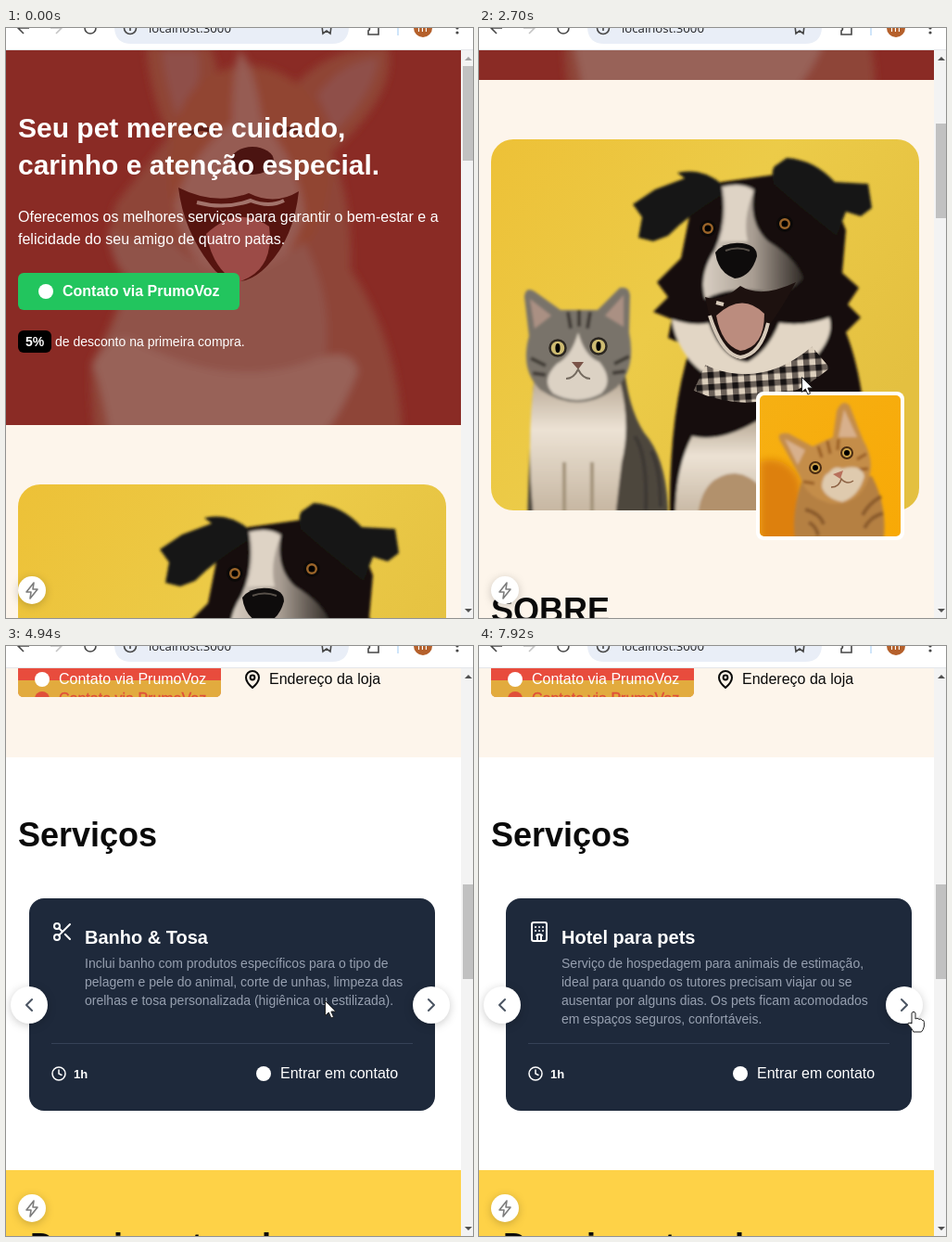
Animation, 504 px wide and 636 px high, one loop 7990 ms. Source, as an HTML page:

```html
<!DOCTYPE html>
<html lang="pt-BR">
<head>
<meta charset="utf-8">
<title>Pet shop</title>
<style>
html, body { margin: 0; width: 100%; height: 100%; overflow: hidden; background: #fff; }
svg { display: block; }
text { font: 16px "Liberation Sans", Arial, sans-serif; fill: #0a0a0a; white-space: pre; }
.w { fill: #fff; }
.b { font-weight: 700; }
.h1 { font-size: 30px; font-weight: 700; }
.h2 { font-size: 36px; font-weight: 700; }
.sm { font-size: 14px; }
.title { font-size: 20px; font-weight: 700; }
.desc { font-size: 14px; fill: #97a0b0; }
.dur { font-size: 13px; font-weight: 700; }
.red { fill: #e0503a; }
.url { font: 13.2px "Open Sans", "Noto Sans", sans-serif; fill: #202124; }
.line { fill: none; stroke-width: 2; stroke-linecap: round; stroke-linejoin: round; }
.ui { fill: none; stroke: #474747; stroke-width: 1.6; }
.soft { filter: drop-shadow(0 2px 5px #0003); }
</style>
</head>
<body>
<svg width="504" height="636" viewBox="0 0 504 636">
  <defs>
    <linearGradient id="sun" x2="1" y2=".6">
      <stop offset="0" stop-color="#edc137"/><stop offset=".5" stop-color="#eccb48"/><stop offset="1" stop-color="#e4c040"/>
    </linearGradient>
    <linearGradient id="amber" x2="1" y2="1">
      <stop offset="0" stop-color="#f6b013"/><stop offset="1" stop-color="#f8a906"/>
    </linearGradient>
    <linearGradient id="muzzle">
      <stop offset="0" stop-color="#d8cec2"/><stop offset=".5" stop-color="#a89d92"/><stop offset="1" stop-color="#2f2925"/>
    </linearGradient>
    <linearGradient id="chest" x2="0" y2="1">
      <stop offset="0" stop-color="#b5a591"/><stop offset=".35" stop-color="#ece2d4"/><stop offset="1" stop-color="#bfae98"/>
    </linearGradient>
    <pattern id="check" width="13" height="13" patternUnits="userSpaceOnUse" patternTransform="rotate(-4)">
      <path fill="#dccfbd" d="M0 0h13v13H0z"/><path fill="#6a6058" d="M0 0h13v6.5H6.5V13H0z"/><path fill="#171313" d="M0 0h6.5v6.5H0z"/>
    </pattern>
    <filter id="blur"><feGaussianBlur stdDeviation="4"/></filter>
    <filter id="fur"><feGaussianBlur stdDeviation="1.5"/></filter>
    <clipPath id="hero"><path d="M0 24h491v404H0z"/></clipPath>
    <clipPath id="photo"><rect x="13" y="292" width="462" height="400" rx="24"/></clipPath>
    <clipPath id="inset"><rect x="303" y="259" width="152" height="152" rx="5"/></clipPath>
    <clipPath id="track"><path d="M13 272h462v229H13z"/></clipPath>
    <clipPath id="band"><path d="M13 639h219v12q0 6-6 6H19q-6 0-6-6z"/></clipPath>
  </defs>

  <g id="page">
    <path fill="#fdf5eb" d="M0 428h491v991H0z"/>
    <path fill="#fff" d="M0 1419h491v445H0z"/>
    <path fill="#fed247" d="M0 1864h491v300H0z"/>

    <!-- hero -->
    <g clip-path="url(#hero)">
      <path fill="#8a2b25" d="M0 24h491v404H0z"/>
      <g filter="url(#blur)">
        <path fill="#8e4537" d="M118 190Q150 150 180 110L345 120Q375 180 372 260Q425 340 428 440H96Q90 390 92 360Q120 310 128 270Q104 240 118 190z"/>
        <path fill="#8f4535" d="M151 20H220Q236 50 218 84L178 122Q156 76 151 20zM306 68Q345 20 412 20Q424 70 352 134z"/>
        <path fill="#8f5049" d="M168 24H206Q214 50 200 76L184 94Q172 60 168 24zM336 72Q362 36 402 32Q396 74 354 112z"/>
        <path fill="#914431" d="M182 110Q196 44 262 40Q330 46 350 120Q356 200 320 240L190 230Q166 170 182 110z"/>
        <path fill="#965c52" d="M252 24Q268 40 276 98Q318 150 322 200Q300 280 240 284Q190 250 182 190Q196 140 244 102Q244 50 252 24z"/>
        <path fill="#90534a" d="M112 215Q140 240 180 230Q240 300 322 230Q352 290 346 350Q300 400 200 390Q110 400 92 366Q120 320 134 270Q108 246 112 215z"/>
        <path fill="#986259" d="M94 362Q120 320 144 340Q240 390 326 360Q372 340 380 370Q360 420 340 440H112Q104 390 94 362z"/>
      </g>
      <path fill="#56140f" d="M186 172Q226 192 262 178Q290 192 316 176Q310 232 276 262Q250 284 226 262Q192 222 186 172z"/>
      <path fill="#9c4b47" d="M216 222Q250 190 284 214Q290 262 250 274Q224 262 216 222z"/>
      <path fill="none" stroke="#a2736b" stroke-width="4" d="M206 188Q236 196 264 186Q284 194 300 186"/>
      <ellipse cx="266" cy="143" rx="23" ry="15" fill="#4b1411"/>
      <path fill="none" stroke="#571c15" stroke-width="5" stroke-linecap="round" d="M199 114q12-10 24-2M296 112q12-8 24 4"/>
    </g>
    <text class="h1 w" x="13" y="118">Seu pet merece cuidado,</text>
    <text class="h1 w" x="13" y="158">carinho e atenção especial.</text>
    <text class="w" x="13" y="209">Oferecemos os melhores serviços para garantir o bem-estar e a</text>
    <text class="w" x="13" y="233">felicidade do seu amigo de quatro patas.</text>
    <rect x="13" y="264" width="239" height="40" rx="6" fill="#22c55e"/>
    <circle class="w" cx="43" cy="284" r="8"/>
    <text class="b w" x="61" y="289">Contato via PrumoVoz</text>
    <rect x="13" y="326" width="36" height="24" rx="6"/>
    <text class="sm b w" x="21" y="343">5%</text>
    <text class="sm w" x="53" y="343">de desconto na primeira compra.</text>

    <!-- dog and cat -->
    <g transform="translate(0 200)" clip-path="url(#photo)">
      <path fill="url(#sun)" d="M13 292h462v400H13z"/>
      <g filter="url(#fur)">
        <path fill="#15110f" d="M232 350L218 420L192 446L204 462L188 478L208 486L204 506L228 516Q204 590 206 710H420Q424 570 396 500L412 484L398 470L410 452L392 436L396 390L380 350L320 330L262 338z"/>
        <path fill="#181412" d="M262 340Q240 322 214 328L222 334L190 346L166 362L176 376L172 398L188 402L204 396Q226 374 262 352zM318 340Q314 322 322 319L332 312Q362 314 384 338L420 340L424 366L412 375L396 370L386 396Q340 360 318 340z"/>
        <path fill="#e2d6c5" d="M208 486Q232 494 248 490Q262 530 290 532Q312 520 324 490Q352 494 378 484Q384 504 362 528Q310 556 240 542Q214 522 208 486z"/>
        <path fill="url(#chest)" d="M230 612Q262 620 306 592V710H212Q210 650 230 612z"/>
        <path fill="#b2916c" d="M236 700Q240 654 276 652Q310 656 316 700z"/>
        <path fill="url(#muzzle)" d="M262 343Q284 338 297 346Q290 382 312 402Q342 420 350 442Q326 466 306 456Q270 450 244 464Q237 438 254 412Q268 382 262 343z"/>
        <path fill="#ded3c5" d="M264 344Q284 338 296 348Q284 380 290 402H260Q270 374 264 344z"/>
      </g>
      <path fill="#1d110f" d="M244 462Q262 468 282 450Q304 464 342 446Q326 476 312 494Q306 528 280 529Q256 522 244 462z"/>
      <path fill="#bb8c7e" d="M256 482Q284 456 308 480Q308 516 282 520Q262 514 256 482z"/>
      <path fill="none" stroke="#d6c9b9" stroke-width="4" d="M249 482Q262 524 282 527Q304 524 312 490M256 468l8 2"/>
      <path fill="#0e0c0c" d="M255 414Q264 402 284 404Q300 406 300 418Q294 440 276 442Q258 436 255 414z"/>
      <path fill="none" stroke="#575049" stroke-width="2" d="M266 412q13-5 26 0"/>
      <g fill="#9a6429" stroke="#0c0908" stroke-width="3"><circle cx="247" cy="388" r="7.5"/><circle cx="330" cy="383" r="7.5"/></g>
      <circle cx="247" cy="388" r="3.5"/><circle cx="330" cy="383" r="3.5"/>
      <path fill="none" stroke="url(#check)" stroke-width="30" d="M238 549Q306 580 369 527"/>

      <g filter="url(#fur)">
        <path fill="#4d463e" d="M60 540L156 530Q160 580 178 608Q206 640 204 710H52Q54 620 60 540z"/>
        <path fill="url(#chest)" d="M60 548Q108 590 152 552Q164 600 154 640Q150 672 146 710H60Q50 620 60 548z"/>
        <path fill="none" stroke="#a39379" stroke-width="4" d="M92 640V700M122 640V700"/>
        <path fill="#79736a" d="M54 504L49 462Q50 450 60 456L88 476H128L152 452Q162 450 163 460L162 500Q170 540 148 560Q108 590 66 562Q44 540 54 504z"/>
        <path fill="#aa9083" d="M55 464L78 482L60 496zM156 460L136 482L156 494z"/>
        <path fill="none" stroke="#3c3833" stroke-width="4" d="M96 478l3 18M108 476v18M120 478l-3 18M56 528l16 8M162 526l-16 8M58 544l14 2M158 542l-14 2M168 612q14 20 12 80M186 628q10 20 10 60"/>
        <path fill="#dcd2c4" d="M107 500Q114 526 130 532Q146 552 132 566Q106 580 80 566Q66 552 84 534Q100 526 107 500z"/>
      </g>
      <g fill="#cdbb72" stroke="#2c2721" stroke-width="2.5"><circle cx="85" cy="517" r="8.5"/><circle cx="129" cy="515" r="8.5"/></g>
      <ellipse cx="85" cy="517" rx="2.6" ry="5"/><ellipse cx="129" cy="515" rx="2.6" ry="5"/>
      <path fill="#7a5348" d="M100 532h13l-6 8z"/>
      <path fill="none" stroke="#756b60" stroke-width="2" d="M94 550q8 0 13-10q5 10 13 10"/>
    </g>

    <!-- ginger cat -->
    <g transform="translate(0 509)">
      <rect x="299" y="255" width="160" height="160" rx="8" fill="#fff"/>
      <g clip-path="url(#inset)">
        <path fill="url(#amber)" d="M303 259h152v152H303z"/>
        <path fill="#dd8008" filter="url(#blur)" d="M303 330Q330 322 346 350L356 420H303z"/>
        <g filter="url(#fur)">
          <path fill="#b58043" d="M348 352Q336 390 342 420H436Q442 380 424 346z"/>
          <path fill="none" stroke="#8a5a2a" stroke-width="4" d="M352 382q16 4 20 16M434 368q-14 8-20 20M436 386q-14 4-20 16M356 396q8 4 10 14"/>
          <path fill="#c48d4a" d="M346 346L325 308Q320 298 334 300L360 314L382 304L386 276Q392 262 400 270L414 306Q428 330 420 350Q410 376 384 376Q354 372 346 346z"/>
          <path fill="#d8b08c" d="M330 306L352 318L344 334zM394 274L408 304L388 304z"/>
          <path fill="none" stroke="#95591f" stroke-width="3" d="M366 314l4 12M376 308l3 14M388 306l-1 12M350 352l12 2M418 322l-10 6M420 338l-10 1"/>
          <path fill="#dfcaae" d="M378 342Q384 334 392 338Q412 332 416 346Q410 368 392 374Q374 370 370 358Q370 346 378 342z"/>
        </g>
        <g fill="#cda24a" stroke="#4a2c12" stroke-width="2"><circle cx="363" cy="337" r="6"/><circle cx="397" cy="321" r="6"/></g>
        <circle cx="363" cy="337" r="3"/><circle cx="397" cy="321" r="3"/>
        <path fill="#b8705c" d="M382 344l11-4l-3 9z"/>
        <path fill="none" stroke="#8d6244" stroke-width="1.5" d="M380 358q9 0 11-9q6 7 13 2"/>
      </g>
    </g>

    <!-- about -->
    <g transform="translate(0 697)">
      <text class="h2" x="13" y="315">SOBRE</text>
      <text x="13" y="364">Until one has loved an animal, a part of one's soul remains</text>
      <text x="13" y="388">unawakened. We believe in it and we believe in easy access to</text>
      <text x="13" y="412">things that are good for our mind, body and spirit. With a clever</text>
      <text x="13" y="436">offering, superb support and a secure checkout you're in good</text>
      <text x="13" y="460">hands.</text>
      <path class="line" stroke="#e84c3d" d="M17 503l6 6l11-12M17 543l6 6l11-12M17 583l6 6l11-12"/>
      <text x="45" y="508">Aberto desde 2006.</text>
      <text x="45" y="548">Equipe com mais de 10 veterinários.</text>
      <text x="45" y="588">Qualidade é nossa prioridade.</text>
      <rect x="13" y="619" width="219" height="38" rx="6" fill="#e84c3d"/>
      <g id="ghost" clip-path="url(#band)">
        <path fill="#e2ab3e" d="M13 639h219v18H13z"/>
        <circle class="red" cx="39" cy="659" r="8"/>
        <text class="red" x="57" y="664" stroke="#e0503a" stroke-width=".4">Contato via PrumoVoz</text>
      </g>
      <circle class="w" cx="39" cy="638" r="8"/>
      <text class="w" x="57" y="643">Contato via PrumoVoz</text>
      <path class="line" stroke="#0a0a0a" d="M273 636c0 5-7 11-7 11s-7-6-7-11a7 7 0 0 1 14 0z"/>
      <circle class="line" stroke="#0a0a0a" cx="266" cy="636" r="2.4"/>
      <text x="284" y="643">Endereço da loja</text>
    </g>

    <!-- services -->
    <g transform="translate(0 1299)">
      <text class="h2" x="13" y="216">Serviços</text>
      <g clip-path="url(#track)"><g id="slides"></g></g>
      <g class="soft"><circle class="w" cx="25" cy="387" r="20"/><circle class="w" cx="459" cy="387" r="20"/></g>
      <path class="line" stroke="#4b5563" d="M28 381l-6 6l6 6M456 381l6 6l-6 6"/>
      <text class="h2" x="26" y="659">Depoimentos dos nossos</text>
    </g>
  </g>

  <!-- fixed badge -->
  <circle class="w soft" cx="28" cy="606" r="15"/>
  <path class="line" stroke="#7c7c7c" style="stroke-width:1.6" d="M30 598l-8 10h5l-1 7l8-10h-5z"/>

  <!-- scrollbar -->
  <path fill="#f3f3f3" d="M491 24h13v612h-13z"/>
  <path id="up" d="M495 35h8l-4-4z"/>
  <path fill="#505050" d="M495 626h8l-4 4z"/>
  <rect id="thumb" x="493" width="11" height="102" fill="#c1c1c1"/>

  <!-- browser bar -->
  <path fill="#fff" d="M0 0h504v24H0z"/>
  <path fill="#e4e6ea" d="M0 23h504v1H0z"/>
  <path fill="#e9eef7" d="M117 0h253q-1 17-18 17H135q-17 0-18-17z"/>
  <path class="ui" d="M25 0H13l6 6M85 0a6 6 0 0 0 12 0"/>
  <path class="ui" style="stroke:#c4c4c4" d="M48 0h12l-6 6"/>
  <circle class="ui" cx="134" cy="0" r="6.5"/>
  <path class="ui" d="M134-1v4M341-2l1 8l4-3l4 3l1-8M391-1q3 2 0 4v4h11V-2"/>
  <text class="url" x="154" y="5">localhost:3000</text>
  <path fill="#cfe5fa" d="M422 0h2v8h-2z"/>
  <circle cx="450" cy="0" r="10" fill="#b5602b"/>
  <text class="w" x="444" y="4" style="font-size:13px">m</text>
  <g fill="#474747"><circle cx="487" cy="0" r="1.6"/><circle cx="487" cy="5" r="1.6"/></g>

  <g id="cursor" stroke="#222" stroke-linejoin="round" fill="#fff">
    <path id="arrow" d="M.5.5v16l3.8-3.5l2.6 6l2.6-1.2l-2.6-5.8h5z"/>
    <path id="hand" d="M-2 1.5Q0-1.2 2 1.5V8q2-2 4 .4q2-1.4 3.2 1q2-.4 2.2 2V16q-1 4-3 6H0q-2-4-6-8q-.4-3 4-1z"/>
  </g>
</svg>
<script>
const LOOP = 7990, STEP = 70, SLIDE = 462;
const $ = id => document.getElementById(id);

const dot = (...pts) => pts.map(p => `M${p}h.01`).join('');
const box = (x, y, w, h) => `<rect x="${x}" y="${y}" width="${w}" height="${h}" rx="2"/>`;
const ring = (x, y, r) => `<circle cx="${x}" cy="${y}" r="${r}"/>`;

const services = [
  { title: 'Banho & Tosa', hours: '1h',
    icon: ring(6, 6, 3) + ring(6, 18, 3) + '<path d="M8.1 8.1L12 12M20 4L8.1 15.9M14.8 14.8L20 20"/>',
    lines: ['Inclui banho com produtos específicos para o tipo de',
      'pelagem e pele do animal, corte de unhas, limpeza das',
      'orelhas e tosa personalizada (higiênica ou estilizada).'] },
  { title: 'Consulta Veterinária', hours: '1h',
    icon: ring(20, 10, 2) + '<path d="M11 2v2M5 2v2M5 3H4a2 2 0 0 0-2 2v4a6 6 0 0 0 12 0V5a2 2 0 0 0-2-2h-1M8 15a6 6 0 0 0 12 0v-3"/>',
    lines: ['Atendimento clínico com profissional especializado',
      'em saúde animal, vacinas e com acompanhamento de',
      'rotina para o seu pet.'] },
  { title: 'Táxi Pet', hours: '2h',
    icon: box(3, 10, 18, 8) + `<path d="M10 2h4M21 8l-2 2l-1.5-3.7A2 2 0 0 0 15.6 5H8.4a2 2 0 0 0-1.9 1.3L5 10L3 8M5 18v2M19 18v2${dot('7 14', '17 14')}"/>`,
    lines: ['Serviço de transporte para levar e buscar os pets no',
      'petshop, clínicas veterinárias ou outros locais. Ideal para',
      'tutores que não têm tempo ou transporte adequado para',
      'locomover os animais.'] },
  { title: 'Hotel para pets', hours: '1h',
    icon: box(4, 2, 16, 20) + `<path d="M10 22v-6.6M14 15.4V22M15 16a5 5 0 0 0-6 0${dot('8 7', '12 7', '16 7', '8 11', '12 11', '16 11')}"/>`,
    lines: ['Serviço de hospedagem para animais de estimação,',
      'ideal para quando os tutores precisam viajar ou se',
      'ausentar por alguns dias. Os pets ficam acomodados',
      'em espaços seguros, confortáveis.'] },
];

const card = (s, i) => `<g transform="translate(${i * SLIDE} 0)">
  <rect y="272" width="438" height="229" rx="16" fill="#1e293b"/>
  <g class="line" stroke="#fff" transform="translate(24 296)">${s.icon}</g>
  <text class="title w" x="60" y="321">${s.title.replace('&', '&amp;')}</text>
  ${s.lines.map((l, n) => `<text class="desc" x="60" y="${347 + n * 20}">${l}</text>`).join('')}
  <path fill="#364257" d="M24 428h390v1H24z"/>
  <g class="line" stroke="#fff" style="stroke-width:1.5">${ring(32, 461, 7)}<path d="M32 457v4l3 1.5"/></g>
  <text class="dur w" x="48" y="466">${s.hours}</text>
  <circle class="w" cx="253" cy="461" r="8"/>
  <text class="w" x="271" y="466">Entrar em contato</text></g>`;
$('slides').innerHTML = services.map(card).join('');

// start, steps, from, to, phase
const scrolls = [
  [1600, 5, 0, 200, .745], [2490, 5, 200, 400, .745], [3170, 5, 400, 600, .745],
  [3710, 8, 600, 1100, 1.04], [4660, 5, 1100, 1299, .745],
];
const clicks = [5820, 6565, 7214];
// time, x, y
const path = [
  [500, 400, 640], [990, 348, 376], [3700, 348, 376], [3780, 346, 379], [4650, 346, 379],
  [4900, 344, 382], [5260, 344, 382], [5680, 475, 396], [6170, 475, 396],
  [6870, 471, 394], [6940, 471, 394], [7700, 469, 394],
];

function scrollAt(t) {
  let y = 0;
  for (const [start, n, from, to, d] of scrolls) {
    if (t < start) break;
    const k = Math.min(n, Math.floor((t - start) / STEP) + 1);
    const x = (k - d) / (n - d);
    y = Math.round(from + (to - from) * x * x * (3 - 2 * x));
  }
  return y;
}

// overdamped spring: share of the way left after t ms
const left = t => t <= 0 ? 1 : (130 * Math.exp(-t / 130) - 64 * Math.exp(-t / 64)) / 66;

function cursorAt(t) {
  if (t < path[0][0]) return [0, -99];
  const i = path.findIndex(p => p[0] > t);
  if (i < 0) return path[path.length - 1].slice(1);
  const [a, b] = [path[i - 1], path[i]], u = (t - a[0]) / (b[0] - a[0]);
  return [1, 2].map(n => Math.round(a[n] + (b[n] - a[n]) * u));
}

const move = (id, x, y) => $(id).setAttribute('transform', `translate(${x} ${y})`);
const show = (id, on) => $(id).style.display = on ? '' : 'none';

function draw(now) {
  const t = now % LOOP;
  const q = 6100 + Math.floor((t - 6100) / STEP) * STEP;
  const y = scrollAt(t), [cx, cy] = cursorAt(q);
  move('page', 0, -y);
  $('thumb').setAttribute('y', Math.round(41 + y * .1662));
  $('up').setAttribute('fill', y ? '#505050' : '#a3a3a3');
  show('ghost', y >= 1299);
  move('slides', 25 - SLIDE * clicks.reduce((s, c) => s + 1 - left(q - c), 0), 0);
  move('cursor', cx, cy);
  show('arrow', cx < 440);
  show('hand', cx >= 440);
}

const t0 = performance.now();
(function tick() {
  draw(performance.now() - t0);
  requestAnimationFrame(tick);
})();
</script>
</body>
</html>
```
